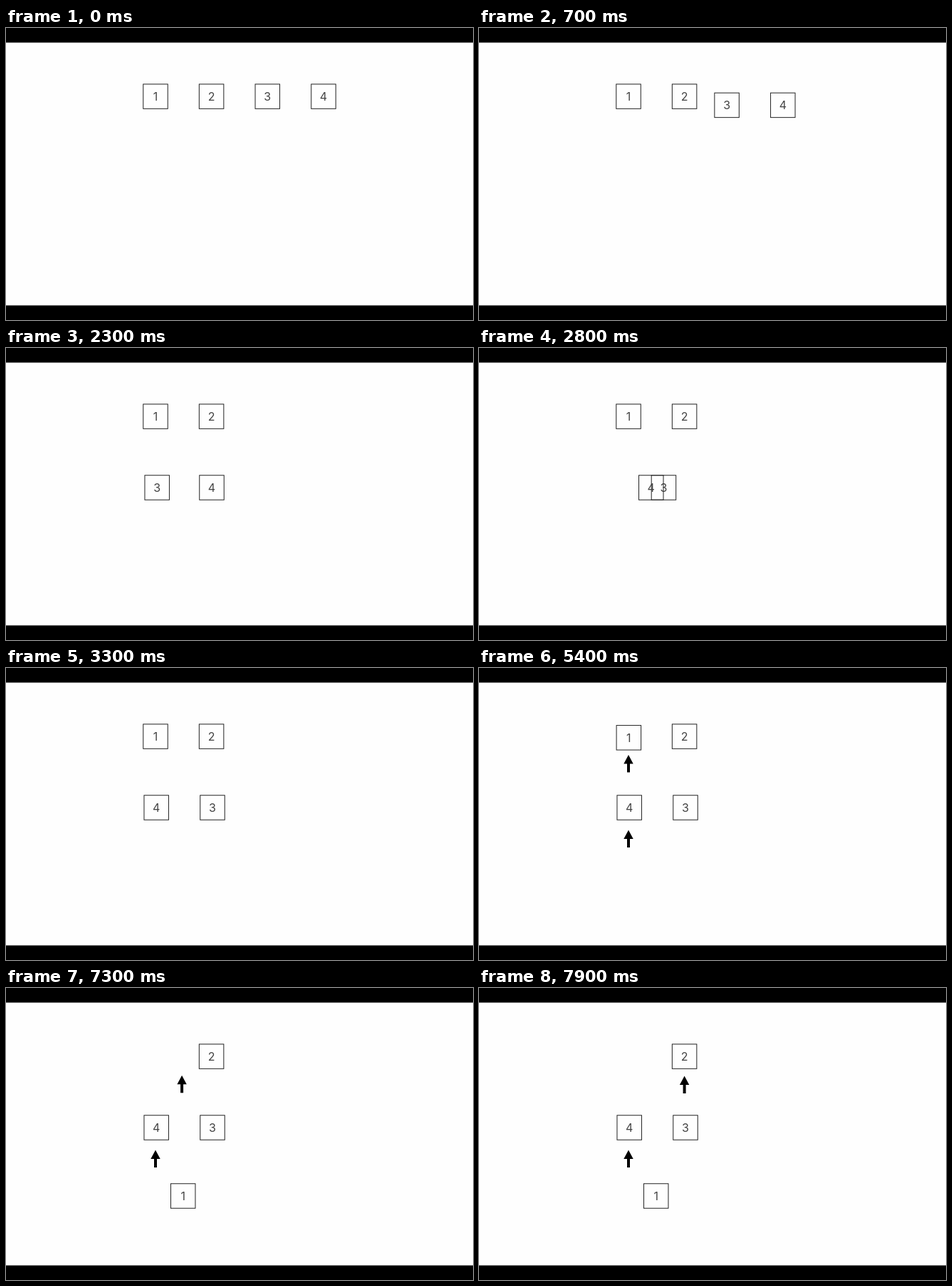
Recreate the animation shown at these times as an HTML page. Size 656 by 410 pixels, loop 8000 ms.

```html
<!DOCTYPE html>
<html lang="en">
<head>
<meta charset="utf-8">
<title>Numbered boxes</title>
<style>
  html, body { margin: 0; height: 100%; overflow: hidden; background: #fff; }
  svg { display: block; width: 656px; height: 410px; }
  .box rect { fill: none; stroke: #222; stroke-width: 1; }
  .box text { font: 400 16px Inter, "Liberation Sans", sans-serif; fill: #444; text-anchor: middle; }
</style>
</head>
<body>
<svg id="stage" viewBox="0 0 656 410">
  <rect width="656" height="410" fill="#fefefe"/>
  <rect width="656" height="20.5" fill="#000"/>
  <rect y="389.5" width="656" height="20.5" fill="#000"/>
</svg>
<script>
const LOOP = 8000, STEP = 100, MOVE = 1000;
const FADE_START = 4400, FADE = 300;
const stage = document.getElementById('stage');

function addGroup(name, markup) {
  const g = document.createElementNS('http://www.w3.org/2000/svg', 'g');
  g.setAttribute('class', name);
  g.innerHTML = markup;
  stage.append(g);
  return g;
}

const box = n => addGroup('box',
  `<rect x="-17.25" y="-17.25" width="34.5" height="34.5"/><text y="5.8">${n}</text>`);

// The arrow's origin is its tip.
const arrow = () => addGroup('arrow',
  '<path d="M0 0L6.7 12.5H2V24.5H-2V12.5H-6.7Z"/>');

// Each move: [start time, x, y], lasting MOVE ms.
const parts = [
  { el: box(1), from: [210, 96.1], moves: [[5340, 248.7, 292]] },
  { el: box(2), from: [288.6, 96.1], moves: [] },
  { el: box(3), from: [367.3, 96.1], moves: [[472, 211.2, 196], [2228, 290, 196]] },
  { el: box(4), from: [446, 96.1], moves: [[472, 290, 196], [2228, 211.2, 196]] },
  { el: arrow(), from: [210, 122], fades: true, moves: [[6818, 288.6, 123.5]] },
  { el: arrow(), from: [210, 227.5], fades: true, moves: [] }
];

const clamp = v => Math.min(1, Math.max(0, v));
const ease = v => (1 - Math.cos(Math.PI * clamp(v))) / 2;

function draw(t) {
  for (const { el, from, moves, fades } of parts) {
    let [x, y] = from;
    for (const [start, toX, toY] of moves) {
      const k = ease((t - start) / MOVE);
      x += (toX - x) * k;
      y += (toY - y) * k;
    }
    el.setAttribute('transform', `translate(${x.toFixed(2)} ${y.toFixed(2)})`);
    if (fades) el.setAttribute('opacity', clamp((t - FADE_START) / FADE));
  }
}

const origin = performance.now();
function tick() {
  const t = (performance.now() - origin) % LOOP;
  draw(Math.floor(t / STEP) * STEP);
  requestAnimationFrame(tick);
}
draw(0);
requestAnimationFrame(tick);
</script>
</body>
</html>
```
